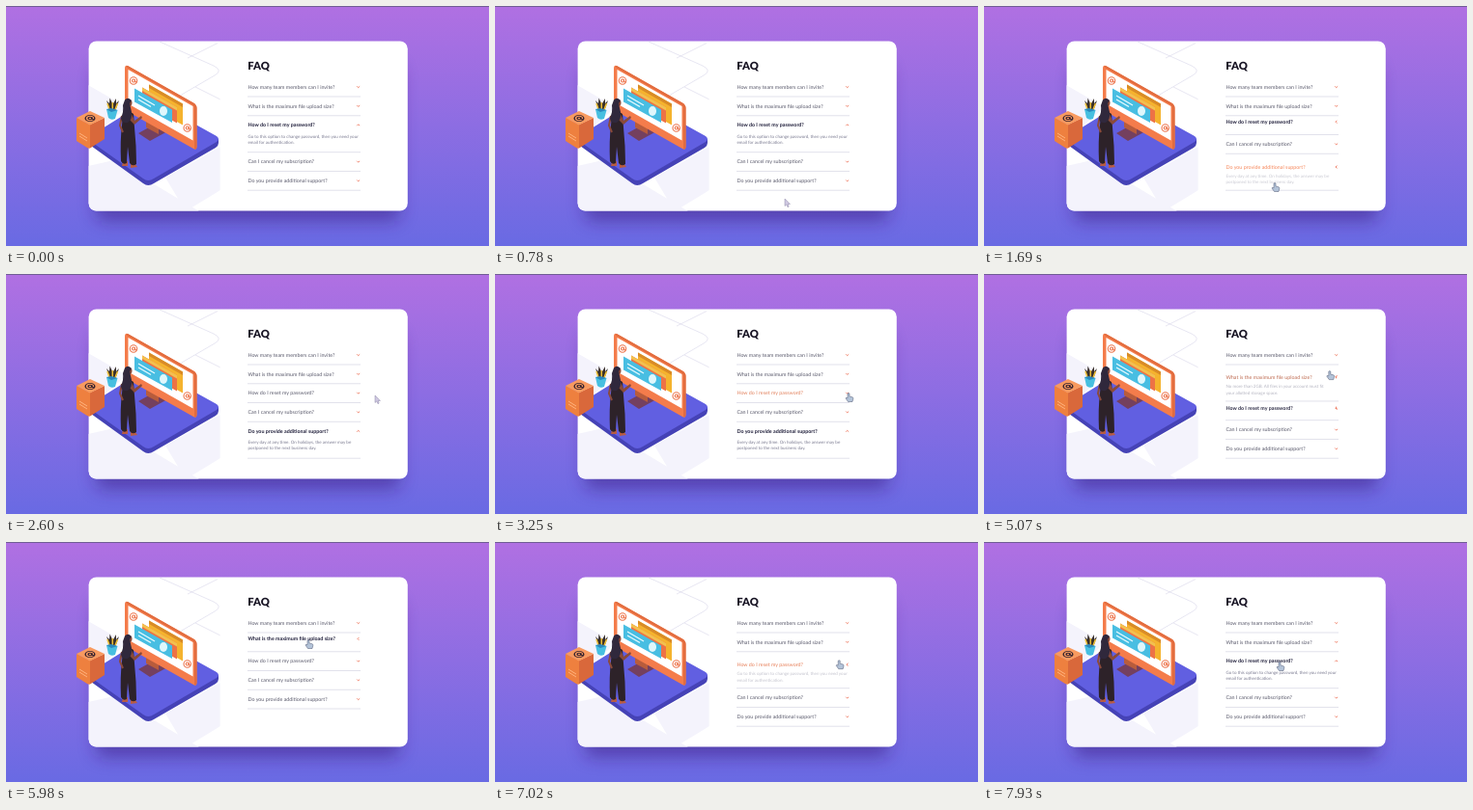
Animation, 500 px wide and 249 px high, one loop 8000 ms. Source, as an HTML page:

```html
<!DOCTYPE html>
<html lang="en">
<head>
<meta charset="utf-8">
<title>FAQ accordion</title>
<style>
html, body { margin: 0; width: 100%; height: 100%; overflow: hidden; background: #8b6ce2; }
svg { display: block; width: 100vw; height: 100vh; }
text { font-family: Lato, "Open Sans", sans-serif; text-rendering: geometricPrecision; }
</style>
</head>
<body>
<svg id="stage" viewBox="0 0 500 249">
  <defs>
    <linearGradient id="sky" x2="0" y2="1">
      <stop stop-color="#b070e2"/><stop offset="1" stop-color="#696ae3"/>
    </linearGradient>
    <filter id="blur" x="-20%" y="-30%" width="140%" height="170%"><feGaussianBlur stdDeviation="9"/></filter>
    <clipPath id="cardClip"><rect x="85.6" y="36.4" width="136" height="176.2" rx="8"/></clipPath>
    <g id="at" fill="none" stroke-width="1.1">
      <circle r="3.7"/><circle r="1.5"/><path d="M1.5-1.5V.8Q2 2 3.2 1"/>
    </g>
  </defs>

  <rect width="500" height="249" fill="url(#sky)"/>
  <rect width="500" height="1" fill="#6f5c94"/>
  <rect x="93" y="62" width="315" height="161" rx="8" fill="#35127a" opacity=".5" filter="url(#blur)"/>
  <rect x="85.6" y="36.4" width="330.2" height="176.2" rx="8" fill="#fff"/>

  <g clip-path="url(#cardClip)">
    <path d="M85 82L125 105L85 140ZM85 166L112 160L200 213H85ZM165 178L222 146V191L186 213Z" fill="#f4f3fc"/>
    <g fill="none" stroke="#dddced" stroke-width=".7">
      <path d="M159 37L215 62Q225 67 216 72L180 93"/>
      <path d="M188 54L222 37M196 84L222 97"/>
    </g>
  </g>

  <!-- platform -->
  <path d="M84.5 137V141Q85 143 88 145L142 184Q147 188 153 184L217 147Q220 145 220 142V138Z" fill="#4542b6"/>
  <path d="M87 135L143 100Q149 97 155 100L218 135Q222 138 218 141L153 179Q147 183 142 179L87 140Q83 137 87 135Z" fill="#615fe1"/>

  <!-- monitor -->
  <path d="M137 132L157 121L169 129L149 140Z" fill="#74405f"/>
  <path d="M145 116L158 124V133L145 126Z" fill="#b85c3c"/>
  <path d="M126 62L194 100.5Q197.5 102.5 197.5 106V146Q197.5 150 194 148L126 109.5Q123 108 123 105V65Q123 61 126 62Z" fill="#f47c4b"/>
  <path d="M126.5 66L193.5 104V139.5L126.5 101.5Z" fill="#fff"/>
  <path d="M126 62L194 100.5Q197.5 102.5 197.5 106V146Q197.5 149 195 148.5V106Q195 104 193 102.5L124 63Z" fill="#e26c3e"/>
  <path d="M148 81.5L183 101.5V123.5L148 103.5Z" fill="#f5b32e"/>
  <path d="M148 81.5L183 101.5V105L148 85Z" fill="#d98b27"/>
  <path d="M141 84.5L177 105V121.5L141 101.5Z" fill="#ed7246"/>
  <path d="M141 84.5L177 105V108.5L141 88Z" fill="#f3c14e"/>
  <path d="M133 85.5L172 107.5V121L133 99.5Z" fill="#48bee2"/>
  <path d="M137 93L154 103M137 97L150 104.5" stroke="#e7faff" stroke-width="1.3"/>
  <ellipse cx="163" cy="109" rx="4" ry="5" fill="#dff7fc"/>
  <use href="#at" x="132" y="77.5" stroke="#ed764e"/>
  <use href="#at" x="187.7" y="126.5" stroke="#ed764e"/>

  <!-- plant -->
  <path d="M109 111L104 98L107 101L107.5 95.5L110.5 102L114 96L114 101L117 98L112 112Z" fill="#38302c"/>
  <path d="M108 110L105 101M110.3 110V100M112 110L115.5 101" stroke="#efbf35" stroke-width="1.5"/>
  <path d="M104 107L115.5 108L113 117Q109 119 106 116Z" fill="#47bfe0"/>
  <path d="M104 107L109 110L115.5 108L109 106Z" fill="#2b88bd"/>

  <!-- woman -->
  <path d="M121 162L126 161L126 166L120 166ZM129 163L133 163L136 167L129 168Z" fill="#b85c42"/>
  <path d="M121 111Q127 107 132 112L133 126Q135 145 135 164Q131 167 128 163L126 146L125 163Q121 165 119 161Q118 140 120 124Z" fill="#2d2229"/>
  <path d="M130 112L133 119L140 114L141 116L133 123L128 118Z" fill="#8a4a39"/>
  <path d="M120 114L118 124L121 131" fill="none" stroke="#8a4a39" stroke-width="2"/>
  <circle cx="127" cy="100.5" r="3.5" fill="#8a4a39"/>
  <path d="M123 97.5Q126 94 130 98L128 101L130 110Q131 118 126 121Q119 122 119 116Q122 110 121 103Z" fill="#30283c"/>

  <!-- box -->
  <path d="M73 116L87 123V147.5Q86 148 84 147L73 140Z" fill="#ee803f"/>
  <path d="M87 123L102 116V138L87 147.5Z" fill="#d9683b"/>
  <path d="M73 116L87 109L102 116L87 123.5Z" fill="#f89a5f"/>
  <path d="M76 132L84 137M76 135L84 140" stroke="#ffb27c" stroke-width="1"/>
  <use href="#at" transform="translate(87 116.5) scale(1.3 .85)" stroke="#3a2530"/>

  <text x="250.3" y="65.9" font-size="11.2" font-weight="900" fill="#1a1626">FAQ</text>
  <g id="list"></g>
  <g id="cursor" stroke-width=".5" stroke-linejoin="round">
    <path id="arrow" d="M-2-4V3.5L-.3 2L1 4.7L2.2 4L1 1.5H3.4Z" fill="#d0c9e2" stroke="#8a84a6"/>
    <path id="hand" d="M-2-4Q-1-5 0-4V-1L3-.3Q4 0 3.8 1.5L3 4.5H-1.5L-4 1Q-4-.4-2 .8Z" fill="#b3c3d8" stroke="#4d5570"/>
  </g>
</svg>
<script>
const STEP = 130, LOOP = 8000, FADE = 780;
const TOP = 84, PITCH = 19.75, EXTRA = 18.2, RULE = 10;
const NAVY = [31, 30, 58], GRAY = [88, 88, 106], ORANGE = [246, 133, 88];
const items = [
  ["How many team members can I invite?", "", ""],
  ["What is the maximum file upload size?", "No more than 2GB. All files in your account must fit", "your allotted storage space."],
  ["How do I reset my password?", "Go to this option to change password, then you need your", "email for authentication."],
  ["Can I cancel my subscription?", "", ""],
  ["Do you provide additional support?", "Every day at any time. On holidays, the answer may be", "postponed to the next business day."]
];
// [time, opened item]
const clicks = [[-2000, 2], [1690, 4], [3510, 2], [4810, 1], [5980, -1], [6890, 2]];
// [item, from, to]
const hovers = [[4, 1040, 1690], [2, 3120, 3510], [1, 4420, 4810], [1, 5980, 6500], [2, 6630, 6890]];
// [time, x, y]
const path = [
  [260, 302, 247], [1040, 302, 189], [1690, 302, 188], [2080, 302, 188], [2600, 384, 130],
  [2730, 383, 129], [3120, 368, 128], [3250, 367, 128], [4030, 367, 127], [4290, 371, 105],
  [4550, 365, 105], [4940, 364, 105], [5590, 314, 106], [6240, 314, 106], [6760, 357, 127],
  [7670, 358, 128], [7930, 307, 129]
];

const $ = id => document.getElementById(id);
const clamp = v => Math.max(0, Math.min(1, v));
const ease = v => v * v * (3 - 2 * v);
const lerp = (a, b, p) => a + (b - a) * p;
const mix = (a, b, p) => a.map((v, i) => lerp(v, b[i], p));
const rgb = c => `rgb(${c.map(Math.round)})`;

function add(parent, tag, attrs, content = "") {
  const el = document.createElementNS("http://www.w3.org/2000/svg", tag);
  set(el, attrs);
  el.textContent = content;
  return parent.appendChild(el);
}
function set(el, attrs) {
  for (const key in attrs) el.setAttribute(key, attrs[key]);
}

const rows = items.map(([question, first, second]) => {
  const group = add($("list"), "g", {});
  const answer = add(group, "g", { fill: "#7b7b91", "font-size": 4.5 });
  add(answer, "text", { x: 250.4, y: 13 }, first);
  add(answer, "text", { x: 250.4, y: 19.3 }, second);
  return {
    group, answer,
    title: add(group, "text", { x: 250.4, "font-size": 5.33 }, question),
    chevron: add(group, "path", { d: "M-1.4-.7L0 .7L1.4-.7", fill: "none", stroke: "#ee7257", "stroke-width": .9 }),
    line: add(group, "path", { d: "M250 0H367", stroke: "#d5d4e2", "stroke-width": .7 })
  };
});

function cursorAt(t) {
  const next = path.findIndex(k => k[0] > t);
  if (next < 0) return path[path.length - 1].slice(1);
  const a = path[Math.max(0, next - 1)], b = path[next];
  const p = ease(clamp((t - a[0]) / (b[0] - a[0])));
  return [lerp(a[1], b[1], p), lerp(a[2], b[2], p)];
}

function draw(t) {
  const current = clicks.filter(c => c[0] <= t).length - 1;
  const [since, open] = clicks[current];
  const closing = current ? clicks[current - 1][1] : -1;
  const p = ease(clamp((t - since) / FADE));
  let y = TOP;

  rows.forEach((row, i) => {
    const isOpen = i === open, isClosing = i === closing;
    const hover = hovers.find(h => h[0] === i && t >= h[1] && t < h[2]);
    const glow = hover ? clamp((t - hover[1]) / 150) : 0;
    const shift = isOpen ? 4 * (1 - p) : isClosing ? -3.3 * (1 - p) : 0;
    const base = isOpen ? mix(ORANGE, NAVY, p) : isClosing ? mix(NAVY, GRAY, p) : GRAY;
    const bold = isOpen ? p > .5 : isClosing && p < .5;
    const turn = isOpen ? lerp(90, 180, p) : isClosing ? lerp(90, 0, p) : 0;

    set(row.group, { transform: `translate(0 ${y})` });
    set(row.title, { y: 1.9 + shift, fill: rgb(mix(base, ORANGE, glow)), "font-weight": bold ? 700 : 400 });
    set(row.chevron, { transform: `translate(364.7 ${shift}) rotate(${turn})` });
    set(row.answer, { opacity: isOpen ? .4 + .6 * p : 0, transform: `translate(0 ${shift / 2})` });
    set(row.line, { transform: `translate(0 ${isOpen ? RULE + EXTRA : RULE})` });
    y += PITCH + (isOpen ? EXTRA : 0);
  });

  const [x, cy] = cursorAt(t);
  const pointing = x > 250 && x < 369 && cy > 78 && cy < 192;
  set($("cursor"), { transform: `translate(${x} ${cy})`, opacity: t < path[0][0] ? 0 : 1 });
  set($("hand"), { opacity: +pointing });
  set($("arrow"), { opacity: +!pointing });
}

function tick() {
  const t = performance.now() % LOOP;
  draw(Math.floor(t / STEP) * STEP);
  requestAnimationFrame(tick);
}
tick();
</script>
</body>
</html>
```
